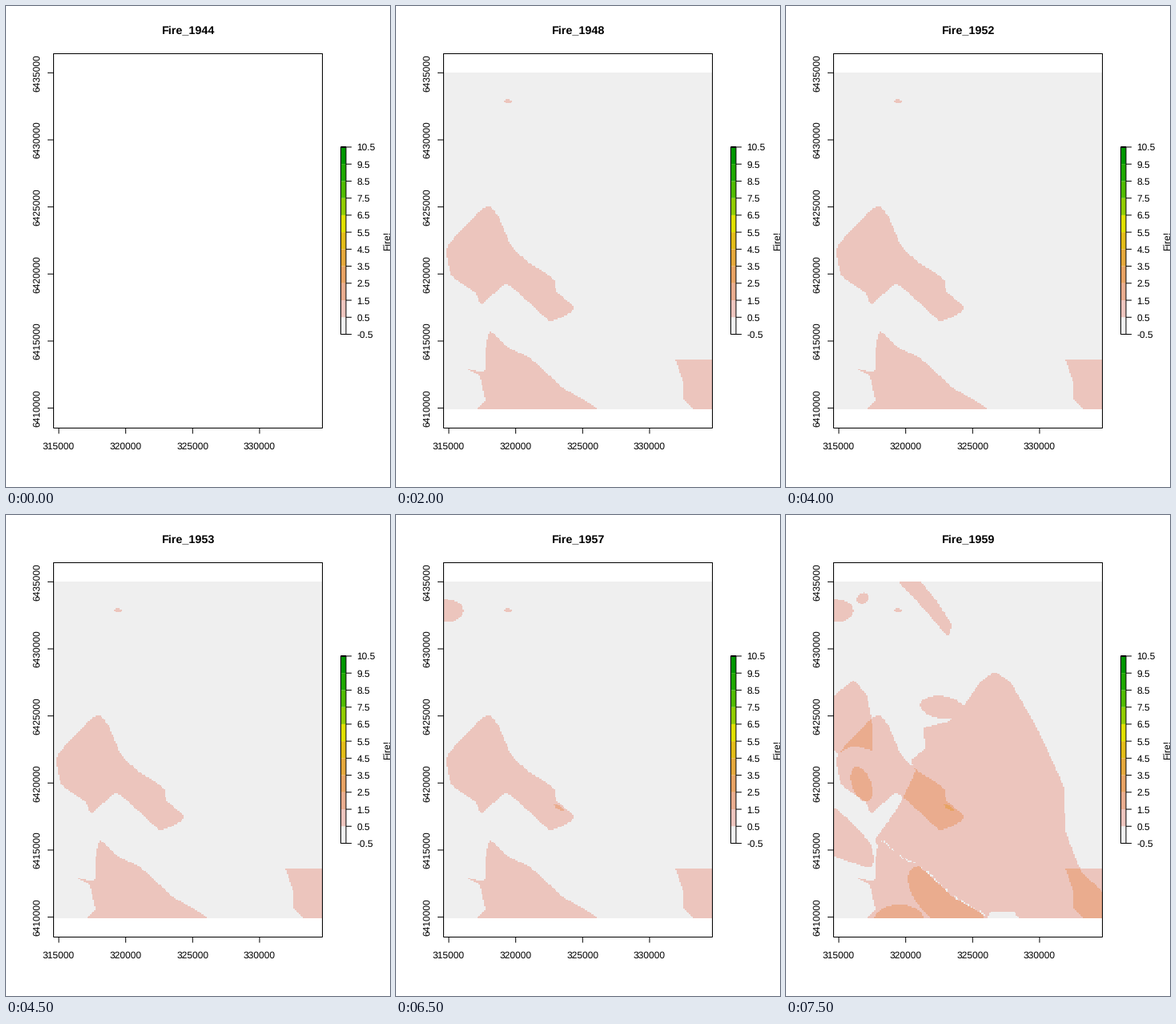
Write a matplotlib script that moves like this. It is 480 by 600 pixels and loops after 8000 ms.

```python
import colorsys

import matplotlib.pyplot as plt
import numpy as np
from matplotlib.animation import FuncAnimation
from matplotlib.patches import Rectangle
from matplotlib.path import Path

W, H, DPI = 480, 600, 100
PX = 72 / DPI
FIRST, YEARS, STEP = 1944, 16, 500
LEFT, RIGHT, TOP, BOTTOM = 59.5, 395.5, 83, 503
COLS, ROWS = 201, 251
GRID = 83.65  # pixels per 5000 m

plt.rcParams["font.family"] = ["Liberation Sans", "DejaVu Sans"]
plt.rcParams["text.hinting"] = "none"


def terrain(n=11, gamma=1.22):
    """Terrain ramp from pale grey up to green, darkened by a display gamma."""
    k = n // 2
    green = [(1 / 3 - t / 6, 1, 0.65 + 0.25 * t) for t in np.linspace(0, 1, k)]
    sand = [((1 - t) / 6, 1 - t, 0.9 + 0.05 * t)
            for t in np.linspace(0, 1, n - k + 1)[1:]]
    rgb = [colorsys.hsv_to_rgb(*c) for c in green + sand]
    return np.array(rgb[::-1]) ** gamma


gx, gy = np.meshgrid(
    LEFT + (np.arange(COLS) + 0.5) * (RIGHT - LEFT) / COLS,
    TOP + (np.arange(ROWS) + 0.5) * (BOTTOM - TOP) / ROWS)


def blob(*points, bend=0.25):
    """Cells inside a closed Hermite curve through a few key points."""
    p = np.array(points, float)
    q = np.roll(p, -1, axis=0)
    m = bend * (q - np.roll(p, 1, axis=0))
    n = np.roll(m, -1, axis=0)
    t = np.linspace(0, 1, 8, endpoint=False)[None, :, None]
    p, q, m, n = (a[:, None, :] for a in (p, q, m, n))
    s = t * t * (3 - 2 * t)
    curve = p + s * (q - p) + t * (1 - t) ** 2 * m - t * t * (1 - t) * n
    inside = Path(curve.reshape(-1, 2)).contains_points(
        np.column_stack([gx.ravel(), gy.ravel()]))
    return inside.reshape(ROWS, COLS)


def oval(x, y, rx, ry, angle=0):
    a = np.radians(angle)
    dx, dy = gx - x, gy - y
    u = dx * np.cos(a) + dy * np.sin(a)
    v = dy * np.cos(a) - dx * np.sin(a)
    return (u / rx) ** 2 + (v / ry) ** 2 < 1


def unburnt_rim(mask, share=0.3):
    """Scattered cells that stay unburnt along the upper right of a burn."""
    rim = np.roll(mask, (-1, 1), axis=(0, 1)) & ~mask
    return rim & (np.random.default_rng(4).random(mask.shape) < share)


west = blob((116, 250), (128, 264), (143, 298), (163, 318), (197, 341),
            (200, 356), (222, 376), (210, 387), (191, 392), (168, 372),
            (137, 347), (107, 372), (99, 358), (69, 336), (64, 300),
            (104, 256))
south = blob((117, 406), (138, 425), (168, 440), (208, 476), (250, 505),
             (105, 505), (111, 492), (104, 462), (89, 453), (110, 456),
             (112, 428))
corner = blob((349, 441), (400, 441), (400, 505), (373, 505), (359, 490),
              (358, 468), bend=0)
strip = blob((140, 82), (166, 82), (188, 108), (206, 136), (202, 151),
             (185, 132), (158, 102))
edge_north = blob((58, 228), (84, 207), (100, 224), (107, 258), (108, 293),
                  (84, 288), (64, 297), (58, 290), bend=0.15)
edge_south = blob((58, 364), (91, 393), (106, 411), (110, 432), (104, 440),
                  (58, 424), bend=0.15)
main = blob((260, 196), (281, 210), (316, 271), (346, 338), (349, 395),
            (369, 445), (400, 475), (400, 505), (294, 505), (284, 494),
            (255, 495), (244, 505), (115, 412), (114, 400), (140, 364),
            (161, 320), (156, 306), (174, 290), (171, 266), (204, 257),
            (222, 238), (240, 211), bend=0.15)
reburn = oval(200, 483, 60, 28, 42) | oval(141, 505, 31, 19)

# Burnt areas by year; overlaps add up
FIRES = {
    1945: [west, oval(139, 119, 5, 2.2)],
    1947: [south],
    1948: [corner],
    1955: [oval(62, 119.5, 22, 14)],
    1957: [oval(203, 365, 7, 2.2, 30)],
    1958: [main & ~south & ~unburnt_rim(south), reburn & south, strip,
           edge_north, edge_south, oval(96, 104, 8, 6.5, -25),
           oval(94, 336, 23, 12, 70), oval(195, 240, 28, 14, 8) & ~main],
}

palette = terrain()
maps = [np.ones((ROWS, COLS, 3))]
count = np.zeros((ROWS, COLS), int)
for year in range(FIRST + 1, FIRST + YEARS):
    count = count + sum(m.astype(int) for m in FIRES.get(year, []))
    maps.append(palette[count])

fig = plt.figure(figsize=(W / DPI, H / DPI), dpi=DPI, facecolor="white")
ax = fig.add_axes([0, 0, 1, 1])
ax.axis("off")
image = ax.imshow(maps[0], extent=(LEFT, RIGHT, BOTTOM, TOP), aspect="auto",
                  interpolation="nearest", zorder=1)
ax.set_xlim(0, W)
ax.set_ylim(H, 0)


def line(xs, ys):
    ax.plot(xs, ys, color="black", lw=PX, solid_capstyle="butt",
            solid_joinstyle="miter", snap=False, zorder=3)


def box(x0, y0, x1, y1):
    line([x0, x1, x1, x0, x0, x1], [y0, y0, y1, y1, y0, y0])


def label(x, y, s, size=12, ha="center", turn=0, **kw):
    return ax.text(x, y, s, fontsize=size * PX, ha=ha, va="baseline",
                   rotation=turn, rotation_mode="anchor", **kw)


# Map frame and axes
box(LEFT, 59.5, RIGHT, 526.5)
for i in range(4):
    x = 66 + GRID * i
    line([x, x], [526.5, 533.5])
    label(x, 553, str(315000 + 5000 * i))
for i in range(6):
    y = 501.6 - GRID * i
    line([52, LEFT], [y, y])
    label(42.3, y, str(6410000 + 5000 * i), turn=90)

# Legend
x0, x1, base, step = 418.5, 425, 409.5, 21.23
for i, color in enumerate(palette):
    ax.add_patch(Rectangle((x0, base - step * (i + 1)), x1 - x0, step,
                           fc=color, lw=0, snap=False, zorder=2))
for i in range(len(palette) + 1):
    y = base - step * i
    line([x1, 432], [y, y])
    label(438.4, y + 4.4, f"{i - 0.5:.1f}", ha="left")
box(x0, base - step * len(palette), x1, base)
label(479.6, 293, "Fire!", turn=90)

title = label(227.3, 34.7, "", size=14.4, weight="bold")


def draw(i):
    image.set_data(maps[i])
    title.set_text(f"Fire_{FIRST + i}")
    return image, title


anim = FuncAnimation(fig, draw, frames=YEARS, interval=STEP, repeat=True,
                     repeat_delay=0, blit=False)
plt.show()
```
